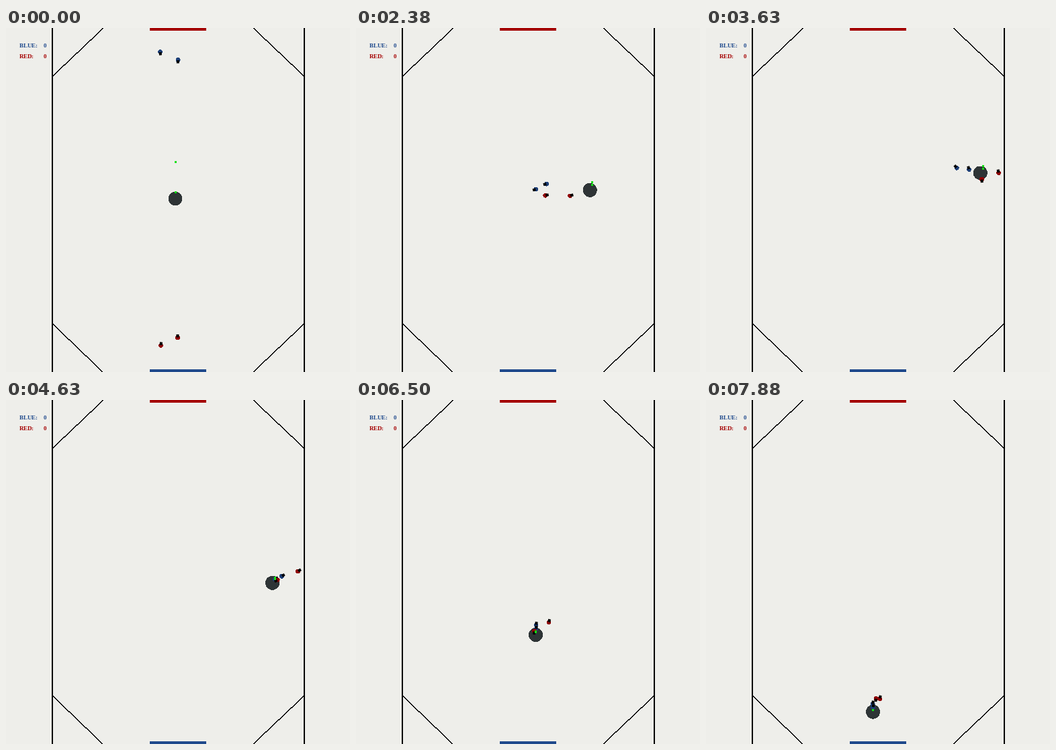
Animation, 512 px wide and 512 px high, one loop 8000 ms. Source, as an HTML page with a canvas:

```html
<!DOCTYPE html>
<html>
<head>
<meta charset="utf-8">
<style>
  html, body { margin: 0; width: 100%; height: 100%; overflow: hidden; background: #eeeeea; }
  canvas { display: block; }
</style>
</head>
<body>
<canvas width="512" height="512"></canvas>
<script>
const ctx = document.querySelector('canvas').getContext('2d');
const LOOP = 8000, STEP = 125, KICK = 1630, WALL = 3040;
const BLUE = '#204a8c', RED = '#a40000', GREEN = '#14e014';
const DARK_BLUE = '#1f4078', DARK_RED = '#900406';

// Waypoints [time, x, y], joined by straight runs
const ballPath = [
  [KICK, 252, 254], [WALL, 434, 230], [3630, 408, 215.5],
  [4630, 396.5, 272.5], [6500, 267.5, 349.5], [7880, 248.5, 464.5]
];

// Each car races from its start line, then chases through the stops.
const STOPS = [2380, 3630, 4630, 6500, 7880];
const makeCar = (color, side, reverseFrom, startX, startY, drift, stops) => ({
  color, side, reverseFrom, startX, startY, drift,
  path: stops.map(([x, y], i) => [STOPS[i], x, y])
});
const cars = [
  makeCar(DARK_BLUE, 1, KICK, 229.5, 35.5, 15.5,
    [[268, 240], [373.5, 208], [410.5, 262.5], [268, 335], [248, 453]]),
  makeCar(DARK_BLUE, 1, KICK, 256, 47.5, -6.5,
    [[284, 232], [392, 210.5], [400.5, 267], [268, 341], [248.5, 458]]),
  makeCar(DARK_RED, -1, LOOP, 230.5, 472.5, 15,
    [[282, 249], [411, 225], [404, 268], [265.5, 344], [253, 444.5]]),
  makeCar(DARK_RED, -1, WALL, 255.5, 461, -2.5,
    [[319, 249.5], [436, 215.5], [434.5, 255], [287, 331], [258.5, 445]])
];

function along(path, t) {
  let i = 1;
  while (i < path.length - 1 && path[i][0] <= t) i++;
  const [t0, x0, y0] = path[i - 1], [t1, x1, y1] = path[i];
  const p = (t - t0) / (t1 - t0);
  return [x0 + (x1 - x0) * p, y0 + (y1 - y0) * p];
}

const ballAt = t => along(ballPath, Math.max(t, KICK));

function carAt(car, t) {
  const race = s => {
    const p = (s / 1375) ** 1.62;
    return [car.startX + car.drift * p, car.startY + car.side * 149 * p];
  };
  return t < KICK ? race(t) : along([[KICK, ...race(KICK)], ...car.path], t);
}

// Hard-edged disc built from pixel rows
function disc(cx, cy, r, color) {
  ctx.fillStyle = color;
  for (let y = Math.ceil(cy - r); y < cy + r; y++) {
    const half = Math.sqrt(Math.max(0, r * r - (y + 0.5 - cy) ** 2));
    const left = Math.round(cx - half);
    ctx.fillRect(left, y, Math.round(cx + half) - left, 1);
  }
}

// Stepped corner line, two pixels tall in each column
function corner(x0, y0, x1, y1) {
  for (let x = x0; x < x1; x++) {
    const y = y0 + (y1 - y0) * (x + 0.5 - x0) / (x1 - x0);
    ctx.fillRect(x, Math.round(y) - 1, 1, 2);
  }
}

function label(text, y, color) {
  ctx.fillStyle = color;
  [...text].forEach((ch, i) => ctx.fillText(ch, 20 + i * 6, y));
}

function field() {
  ctx.fillStyle = '#eeeeea';
  ctx.fillRect(0, 0, 512, 512);
  ctx.fillStyle = '#000';
  for (const x of [68, 443]) ctx.fillRect(x, 0, 2, 512);
  corner(68, 73, 145, 0);
  corner(368, 0, 444, 72);
  corner(69, 440, 144, 512);
  corner(368, 512, 444, 440);
  ctx.fillStyle = RED;
  ctx.fillRect(214, 0, 84, 4);
  ctx.fillStyle = BLUE;
  ctx.fillRect(214, 508, 84, 4);
  ctx.font = 'bold 9px "Liberation Serif", serif';
  label('BLUE: 0', 29, BLUE);
  label('RED:  0', 45, RED);
}

function drawCar(car, t) {
  const [x, y] = carAt(car, t), [nx, ny] = carAt(car, t + 60);
  const flip = t >= car.reverseFrom ? Math.PI : 0;
  disc(x, y, 3.5, car.color);
  ctx.save();
  ctx.translate(x, y);
  ctx.rotate(Math.atan2(ny - y, nx - x) + flip);
  ctx.fillStyle = '#000';
  ctx.fillRect(0.5, -2, 4.5, 4);
  ctx.restore();
}

// Two dots above the ball; the upper one falls, then settles.
function drawMarks(x, y, t) {
  const gap = Math.max(45 - 38 * (t / 1375) ** 2, 7 - t * 0.0009);
  const mx = x + (x - 252) * 0.03, my = y - 9.5 + t * 0.0009;
  ctx.fillStyle = GREEN;
  for (const top of [my, my - gap]) {
    ctx.fillRect(Math.round(mx - 1.5), Math.round(top - 1.5), 3, 3);
  }
}

function frame(now) {
  const t = Math.floor(now % LOOP / STEP) * STEP;
  const [x, y] = ballAt(t);
  field();
  disc(x, y, 10.5, '#2e3436');
  cars.forEach(car => drawCar(car, t));
  drawMarks(x, y, t);
}

let start;
function loop(now) {
  start ??= now;
  frame(now - start);
  requestAnimationFrame(loop);
}
requestAnimationFrame(loop);
</script>
</body>
</html>
```
